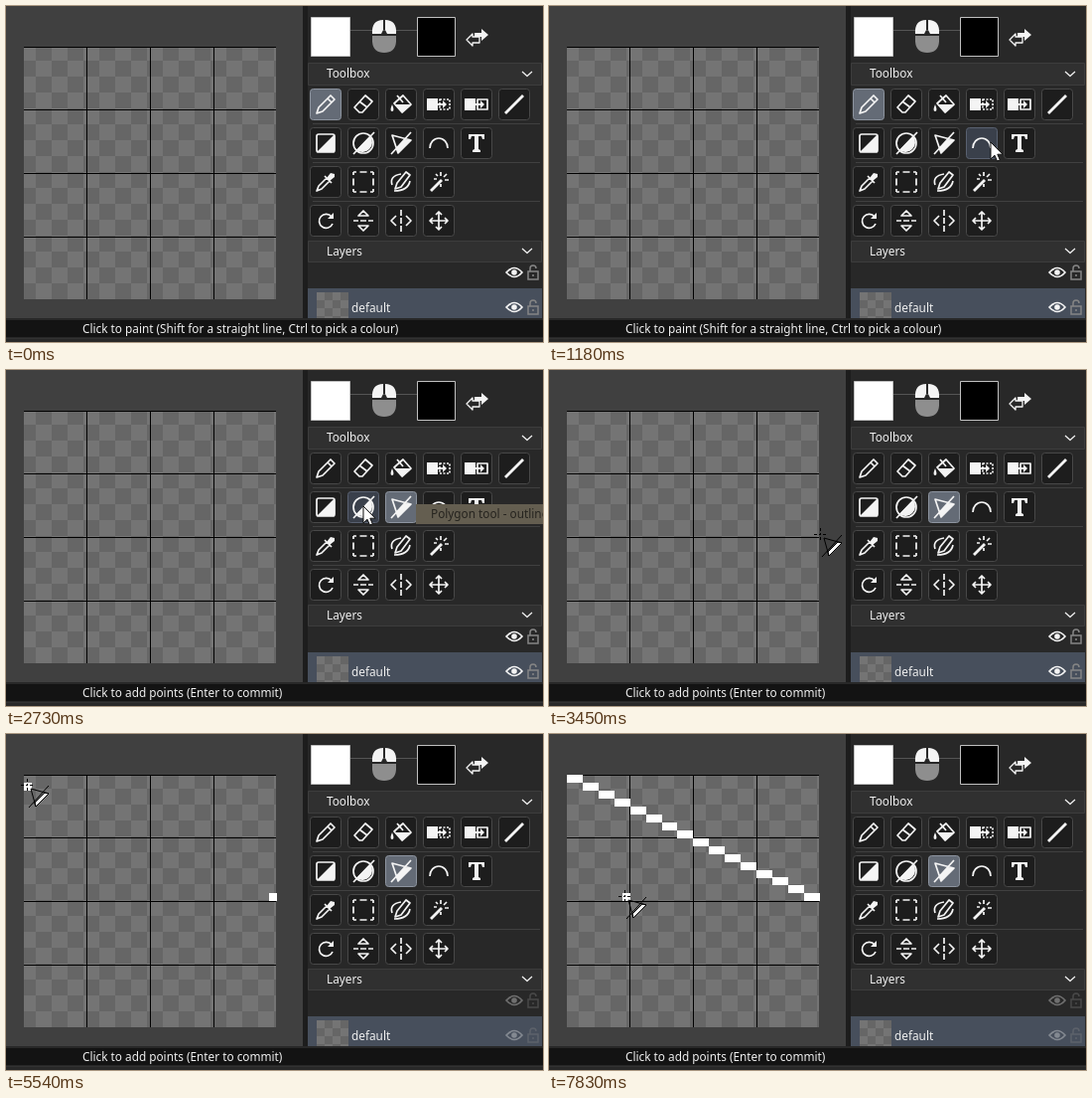
Animation, 541 px wide and 338 px high, one loop 8 s. Source, as an HTML page:

```html
<!DOCTYPE html>
<html lang="en">
<head>
<meta charset="utf-8">
<title>Polygon tool</title>
<style>
html, body { margin: 0; width: 100%; height: 100%; overflow: hidden; background: #404040; }
svg { display: block; }
text { font: 11.8px "Noto Sans", sans-serif; fill: #efefef; }
.button rect { fill: #1d1d1d; stroke: #484848; }
.button.hover rect { fill: #3a404b; stroke: #596170; }
.button.on rect { fill: #646b76; stroke: #8d949f; }
.line { fill: none; stroke: #f4f4f4; stroke-width: 1.7; stroke-linejoin: round; }
.solid { fill: #f4f4f4; }
</style>
</head>
<body>
<svg width="541" height="338" viewBox="0 0 541 338">
  <defs>
    <pattern id="checks" x="30" y="55" width="32" height="32" patternUnits="userSpaceOnUse">
      <path fill="#666" d="M0 0h32v32H0z"/>
      <path fill="#747474" d="M0 0h16v16H0zM16 16h16v16H16z"/>
    </pattern>
    <pattern id="smallChecks" href="#checks" x="0" y="0" patternTransform="translate(313 288) scale(.5)"/>
    <g id="eye">
      <path class="line" d="M-8 0Q0-9 8 0Q0 9-8 0z"/>
      <circle class="solid" r="2.8"/>
    </g>
    <path id="lock" fill="none" stroke="#858585" stroke-width="1.5" d="M-5-1H5V7H-5zM-3-1V-4Q-3-7 0-7Q3-7 3-4M0 2V4"/>
    <path id="chevron" class="line" style="stroke-width:1.2" d="M-5-2L0 2.5L5-2"/>
  </defs>

  <path fill="#404040" d="M0 0h541v338H0z"/>
  <path fill="url(#checks)" d="M18 41h254v254H18z"/>
  <path stroke="#000" shape-rendering="crispEdges" d="M18 41.5H272M18 104.5H272M18 168.5H272M18 232.5H272M81.5 41V295M145.5 41V295M209.5 41V295"/>
  <g id="ink" fill="#fff" shape-rendering="crispEdges"></g>

  <path fill="#1d1d1d" d="M299 0h5v316h-5z"/>
  <path fill="#282828" d="M304 0h237v314H304z"/>
  <path stroke="#555" d="M347 24.5H414"/>
  <path fill="#fff" stroke="#c0c0c0" d="M307.5 11.5h39v39h-39z"/>
  <path stroke="#c0c0c0" d="M414.5 11.5h38v39h-38z"/>
  <path class="solid" d="M369 28Q368 14 380 14V24L378 28zM393 28Q394 14 382 14V24L384 28z"/>
  <path fill="#8e8e8e" d="M369 30H393V36Q392 47 381 47Q370 47 369 36z"/>
  <path class="line" style="stroke-width:1.3" d="M464 34L470 28V31H477V37H470V40z"/>
  <path class="solid" d="M472 27H479V23L486 29L479 35V31H472z"/>

  <path fill="#303030" stroke="#3d3d3d" d="M304.5 57.5h235v22h-235zM304.5 236.5h235v21h-235z"/>
  <path stroke="#404040" d="M309 118.5H538M309 157.5H538M309 196.5H538"/>
  <text x="323" y="72">Toolbox</text>
  <text x="323" y="251">Layers</text>
  <use href="#chevron" x="525" y="68"/>
  <use href="#chevron" x="525" y="246"/>
  <g id="tools"></g>

  <path fill="#474f5c" d="M304 284h236v30H304z"/>
  <path fill="url(#smallChecks)" d="M313 288h32v26h-32z"/>
  <text x="348" y="308">default</text>
  <g id="layerIcons">
    <use href="#eye" x="512" y="268"/><use href="#lock" x="531" y="268"/>
    <use href="#eye" x="512" y="303"/><use href="#lock" x="531" y="303"/>
  </g>

  <path fill="#282828" d="M0 314h541v24H0z"/>
  <path fill="#131313" d="M0 316h541v17H0z"/>
  <path stroke="#323232" d="M0 334.5H541"/>
  <text id="status" x="77" y="329"></text>

  <g id="tooltip">
    <path fill="#645e50" d="M413 135h128v20H413z"/>
    <text x="428" y="149" style="fill:#26241f">Polygon tool - outlined</text>
  </g>
  <path id="arrow" fill="#fff" stroke="#111" d="M0 0V17L4 13.2L6.5 19L9.3 17.8L6.8 12.2H12z"/>
  <g id="polyCursor" fill="none" stroke="#000">
    <path d="M-6 .5H-3M-1 .5H1M3 .5H6M.5-6V-3M.5-1V1M.5 3V6"/>
    <path fill="#fff" d="M8 18L18 8L22 9L9 22z"/>
    <path d="M4 4L22 9L9 22zM2 23L22 1"/>
  </g>
</svg>
<script>
const $ = id => document.getElementById(id);
const LOOP = 8000, CELL = 7.96, LEFT = 18, TOP = 41;
const PENCIL = 0, POLYGON = 8;

// One row per toolbox line: [stroked path, filled path, dash pattern]
const toolRows = [
  [
    ['M-9 9L-7 3L5-9L9-5L-3 7zM2-6L6-2'],
    ['M-9 3L2-9L9-3L-1 8H-4zM-4-3L4 3'],
    ['M-7-1L2-9L10 0L1 8zM-4-9L2-2', 'M-6 0H9L1 8zM-9 0Q-12 7-9 7Q-6 7-9 0z'],
    ['M1-5H11V5H1z', 'M-12-6H-1V6H-12zM-1-1H4V-4L8 0L4 4V1H-1z', '2 1.5'],
    ['M1-5H11V5H1z', 'M-12-6H-1V6H-12zM-1-1H4V-4L8 0L4 4V1H-1z'],
    ['', 'M-10 8L8-10L10-8L-8 10z']
  ], [
    ['M-7-9H7Q9-9 9-7V7Q9 9 7 9H-7Q-9 9-9 7V-7Q-9-9-7-9z', 'M9-9V9H-9z'],
    ['M-10 0A10 10 0 0 1 10 0A10 10 0 0 1-10 0M-10 11L11-11', 'M7-7A10 10 0 0 1-7 7z'],
    ['M-9-8L10-3L-3 10zM-10 11L10-11', 'M4-4L10-3L-3 10L-5 5z'],
    ['M-9 5A9 10 0 0 1 9 5'],
    ['', 'M-8-9H8V-4H6L5-7H2V6L4 7V9H-4V7L-2 6V-7H-5L-6-4H-8z']
  ], [
    ['M-9 9L-7 4L1-4L4-1L-4 7zM-1-6L6 1', 'M1-4L5-9L9-8V-5L4-1z'],
    ['M-10-10H10V10H-10z', '', '3 3.5 7 3.5 3 0'],
    ['M-6 7L-4 1L5-10L9-7L0 5zM-9 3Q-12-6 0-8M-7 9Q7 9 9-1'],
    ['M2-10V-6M2 2V5M-5-3H-2M6-2H10M-3-8L-1-6M8-8L5-5', 'M-9 8L2-3L4-1L-7 10z']
  ], [
    ['M6-4A7 7 0 1 0 7 3', 'M2-2H8V-8z'],
    ['M-10 0H-5M-3 0H3M5 0H10M-5-5L0-10L5-5zM-5 5L0 10L5 5z'],
    ['M0-11V-5M0-3V3M0 5V11M-5-5L-10 0L-5 5M5-5L10 0L5 5'],
    ['M-9 0H9M0-9V9M-3-6L0-9L3-6M-3 6L0 9L3 6M-6-3L-9 0L-6 3M6-3L9 0L6 3']
  ]
];
const buttons = toolRows.flatMap((row, j) => row.map((icon, i) => ({ x: 306 + 38 * i, y: 83 + 39 * j, icon })));
$('tools').innerHTML = buttons.map(({ x, y, icon: [line, solid = '', dash = ''] }) =>
  `<g class="button" transform="translate(${x} ${y})">
    <rect x=".5" y=".5" width="31" height="31" rx="3"/>
    <g transform="translate(16 16)"><path class="solid" d="${solid}"/>
    <path class="line" stroke-dasharray="${dash}" d="${line}"/></g></g>`).join('');
const buttonNodes = [...document.querySelectorAll('.button')];

const refreshes = [0, 2180, 3910, 4370, 6100, 6560];
for (const [from, to] of [[460, 1810], [2640, 3540], [4550, 5540], [6840, 7830]])
  for (let t = from; t <= to; t += 90) refreshes.push(t);

// Pointer path: time, x, y
const path = [
  [0, 570, 140], [370, 570, 140], [460, 531, 141], [640, 488, 141], [820, 461, 139], [1180, 445, 137],
  [1270, 440, 136], [1540, 408, 136], [1810, 397, 136], [2550, 397, 136],
  [2640, 381, 136], [2730, 360, 137], [3000, 306, 152], [3360, 277, 168], [3540, 268, 162], [4460, 268, 161],
  [4550, 240, 158], [4640, 196, 140], [4730, 148, 112], [5000, 70, 75], [5270, 30, 57], [5540, 21, 51],
  [6100, 21, 48], [6750, 21, 48], [6840, 34, 64], [6930, 55, 91], [7020, 63, 102],
  [7290, 72, 138], [7560, 77, 157], [7830, 76, 163]
];

function pointer(t) {
  const next = path.findIndex(key => key[0] > t);
  if (next < 1) return path.at(next).slice(1);
  const [t0, x0, y0] = path[next - 1], [t1, x1, y1] = path[next];
  const k = (t - t0) / (t1 - t0);
  return [x0 + (x1 - x0) * k, y0 + (y1 - y0) * k];
}

function pixel(col, row, width = 1) {
  const x = Math.round(LEFT + col * CELL), y = Math.round(TOP + row * CELL);
  const right = Math.round(LEFT + (col + width) * CELL);
  return `<path d="M${x} ${y}H${right}v8H${x}z"/>`;
}

function ink(t) {
  let marks = '';
  if (t >= 3910) marks += pixel(31, 15);
  if (t >= 6100) marks += pixel(0, 0);
  if (t >= 6560) for (let row = 0; row < 16; row++) marks += pixel(row * 2, row, 2);
  // The brush preview trails slightly behind the pointer
  const [x, y] = pointer(t - 30);
  const col = Math.floor((x - LEFT) / CELL), row = Math.floor((y - TOP) / CELL);
  if (t >= 2180 && col >= 0 && col < 32 && row >= 0 && row < 32) marks += pixel(col, row);
  return marks;
}

const show = (id, visible) => $(id).setAttribute('visibility', visible ? 'visible' : 'hidden');
let shown = -1;

function draw(now) {
  requestAnimationFrame(draw);
  const clock = now % LOOP;
  const t = Math.max(...refreshes.filter(r => r <= clock));
  if (t === shown) return;
  shown = t;

  const [x, y] = pointer(t).map(Math.round);
  const onCanvas = x < 300, picked = t >= 2180;
  buttonNodes.forEach((node, i) => {
    const b = buttons[i];
    node.classList.toggle('on', i === (picked ? POLYGON : PENCIL));
    node.classList.toggle('hover', x >= b.x && x < b.x + 32 && y >= b.y && y < b.y + 32);
  });
  $('ink').innerHTML = ink(t);
  $('status').textContent = picked
    ? 'Click to add points (Enter to commit)'
    : 'Click to paint (Shift for a straight line, Ctrl to pick a colour)';
  $('layerIcons').setAttribute('opacity', t >= 4370 ? 0.35 : 1);
  show('tooltip', t >= 2180 && t < 2820);
  show('arrow', !onCanvas);
  show('polyCursor', onCanvas);
  $(onCanvas ? 'polyCursor' : 'arrow').setAttribute('transform', `translate(${x} ${y})`);
}
requestAnimationFrame(draw);
</script>
</body>
</html>
```
